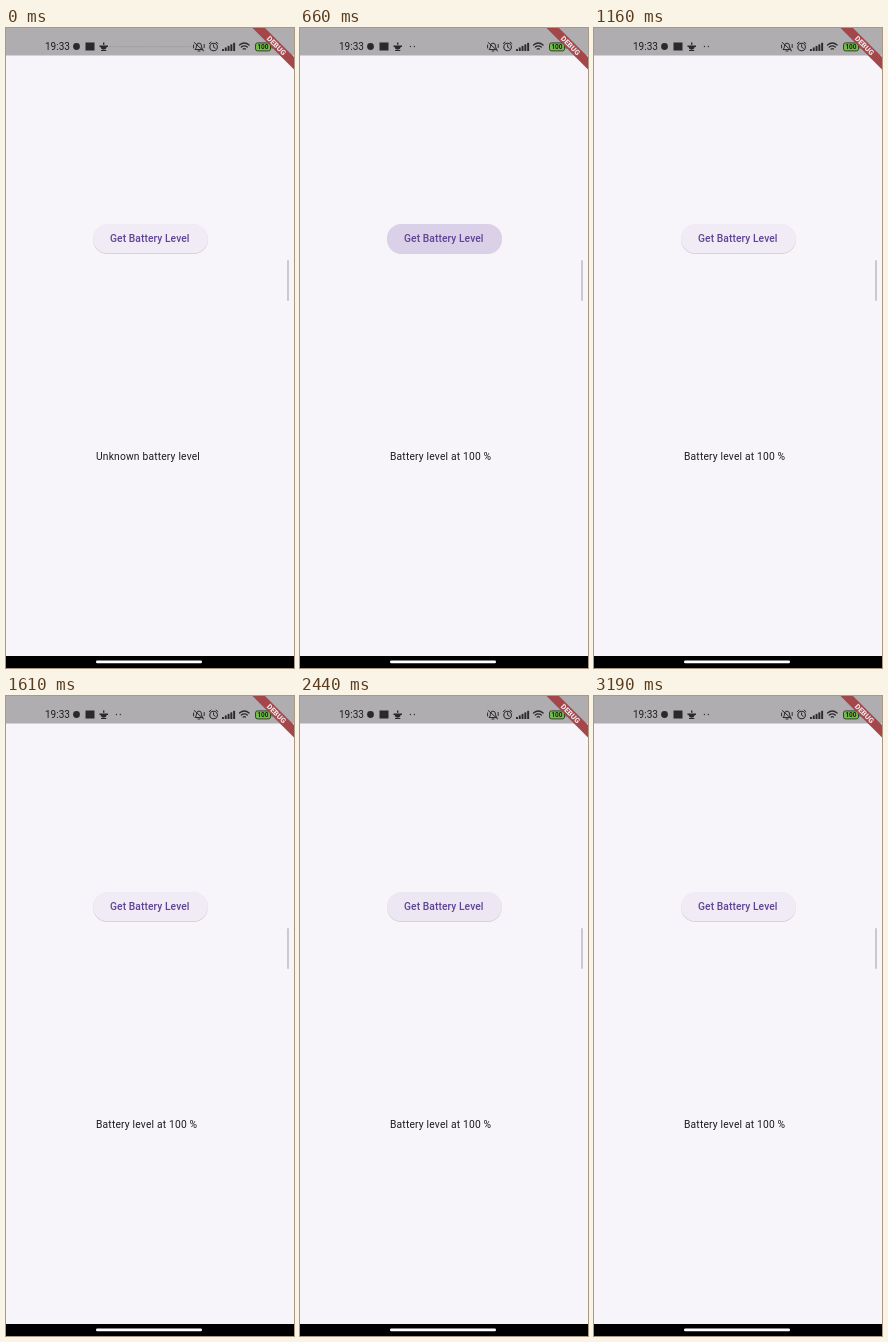
These frames come from a looping animation (288x640 px, 3240 ms). An HTML page:

```html
<!DOCTYPE html>
<html lang="en">
<head>
<meta charset="utf-8">
<title>Battery level</title>
<style>
  html, body { margin: 0; width: 100%; height: 100%; overflow: hidden; background: #f8f5fa; }
  svg { display: block; width: 288px; height: 640px; }
  text { font-family: Roboto, sans-serif; fill: #1d1b20; }
  .line { fill: none; stroke: #2a292c; stroke-linecap: round; }
</style>
</head>
<body>
<svg viewBox="0 0 288 640">
  <defs>
    <filter id="soft" x="-10%" y="-30%" width="120%" height="160%">
      <feGaussianBlur stdDeviation=".6"/>
    </filter>
    <clipPath id="stage"><rect width="288" height="640"/></clipPath>
  </defs>
  <rect width="288" height="640" fill="#f8f5fa"/>
  <rect width="288" height="27.5" fill="#b0adb1"/>

  <!-- Status bar, left -->
  <text x="39" y="22.3" font-size="10">19:33</text>
  <g fill="#2a292c">
    <circle cx="70.5" cy="18.5" r="3.4"/>
    <rect x="79.5" y="14.5" width="9" height="8"/>
    <path d="M93.5 17.5h8.5v1.5h-1.2q-.6 2.8-3.1 2.8t-3.1-2.8h-1.1zM95 22h5.3v1H95zM97 14.5h1.4v2.2H97z"/>
    <g id="dots"><circle cx="110.4" cy="18.5" r=".65"/><circle cx="114.3" cy="18.5" r=".65"/></g>
  </g>
  <path id="trail" d="M104 18.7H187" fill="none" stroke="#939095" stroke-width=".8" stroke-dasharray="1.5 1"/>

  <!-- Status bar, right -->
  <g class="line">
    <path d="M189.3 21.3q1.2-1 1.2-3.2 0-3 2.5-3t2.5 3q0 2.2 1.2 3.2zM192 23h2M188.2 14.5l9.5 8.5M187.6 17v3M198.2 16.5v3" stroke-width="1"/>
    <circle cx="207.6" cy="19" r="3.8" stroke-width="1.1"/>
    <path d="M207.6 16.8v2.4l1.6 1M203.3 15.6l1.8-1.5M211.9 15.6l-1.8-1.5" stroke-width="1"/>
    <path d="M233.5 17q4.8-4 9.6 0M235.3 19.1q3-2.5 6 0M237.2 21q1.1-.9 2.2 0" stroke-width="1.3"/>
  </g>
  <g id="signal" fill="#2a292c"></g>
  <rect x="249.5" y="14.9" width="15" height="8" rx="2" fill="#72bd45" stroke="#34402f"/>
  <rect x="265.5" y="17.3" width="1.2" height="3.2" fill="#34402f"/>
  <text x="257" y="21.3" font-size="6.5" font-weight="700" text-anchor="middle">100</text>

  <!-- Debug ribbon -->
  <g clip-path="url(#stage)">
    <g transform="translate(288 0) rotate(45)">
      <rect x="-29.3" y="20.5" width="58.6" height="8.8" fill="#a3474b"/>
      <text y="27.4" font-size="7.4" font-weight="900" text-anchor="middle" style="fill:#f1e2e6">DEBUG</text>
    </g>
  </g>

  <!-- Button -->
  <rect id="shadow" x="87" y="196.6" width="115" height="29.5" rx="14.7" fill="#6f6878" filter="url(#soft)"/>
  <rect x="87" y="196" width="115" height="29.3" rx="14.65" fill="#f0ebf5"/>
  <rect id="ink" x="87" y="196" width="115" height="29.3" rx="14.65" fill="#dad1e8"/>
  <text x="104" y="214.3" font-size="10.27" font-weight="500" letter-spacing=".073" style="fill:#5f4396">Get Battery Level</text>

  <text id="level" x="90" y="432" font-size="10.27" letter-spacing=".183"></text>

  <rect x="281" y="232" width="2" height="41" rx="1" fill="#cbc8ce"/>
  <rect y="628" width="288" height="12" fill="#000"/>
  <rect x="90" y="632.6" width="106" height="2.6" rx="1.3" fill="#fff"/>
</svg>
<script>
  const LOOP = 3240;
  const PRESSES = [490, 1930];
  const REPORT_AT = 600;
  const byId = id => document.getElementById(id);
  const clamp = v => Math.max(0, Math.min(1, v));
  const smooth = v => { v = clamp(v); return v * v * (3 - 2 * v); };

  byId('signal').innerHTML = Array.from({ length: 5 }, (_, i) =>
    `<rect x="${216 + i * 2.8}" y="${21 - i * 1.55}" width="1.9" height="${2 + i * 1.55}"/>`).join('');

  // Highlight fades in on touch, holds, then fades out.
  const pressAmount = age => smooth(age / 120) * (1 - smooth((age - 240) / 375));

  function draw(t) {
    const press = Math.max(...PRESSES.map(start => pressAmount(t - start)));
    const opening = t < 200;
    byId('ink').setAttribute('opacity', press);
    byId('shadow').setAttribute('opacity', .3);
    byId('trail').setAttribute('opacity', opening ? 1 : 0);
    byId('dots').setAttribute('opacity', opening ? 0 : 1);
    byId('level').textContent = t < REPORT_AT ? 'Unknown battery level' : 'Battery level at 100 %';
  }

  const begin = performance.now();
  function tick() {
    draw((performance.now() - begin) % LOOP);
    requestAnimationFrame(tick);
  }
  tick();
</script>
</body>
</html>
```
